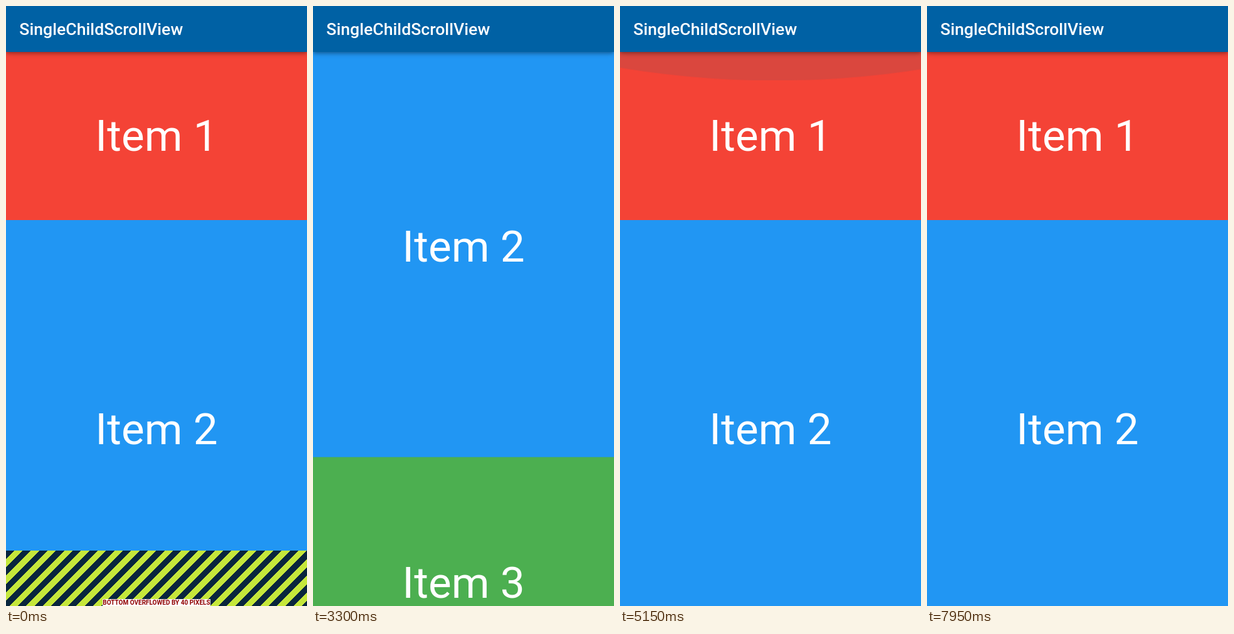
An HTML page for the animation above (8000 ms loop, 480 by 953 pixels).

```html
<!DOCTYPE html>
<html lang="en">
<head>
<meta charset="utf-8">
<title>SingleChildScrollView</title>
<style>
  html, body { margin: 0; width: 100%; height: 100%; overflow: hidden; }
  body { position: relative; background: #2196f3; color: #fff; font-family: Roboto, sans-serif; }

  header {
    position: absolute; top: 0; left: 0; width: 100%; height: 73px;
    box-sizing: border-box; padding-left: 21.33px;
    background: #0061a4;
    font-size: 26.67px; font-weight: 500; line-height: 75px;
    box-shadow: 0 2px 5px -1px rgba(0, 0, 0, .22), 0 4px 6px rgba(0, 0, 0, .14), 0 1px 10px rgba(0, 0, 0, .12);
  }

  main { position: absolute; top: 73px; left: 0; width: 100%; height: 880px; overflow: hidden; }

  .list { animation: scroll 8s linear infinite; }
  .item { display: flex; align-items: center; justify-content: center; font-size: 69.33px; }
  .one { height: 266.67px; background: #f44336; }
  .two { height: 666.67px; background: #2196f3; }
  .three { height: 400px; background: #4caf50; }

  /* Hazard strip shown while the column cannot scroll */
  .overflow {
    position: absolute; bottom: 0; left: 0; width: 100%; height: 88px;
    display: flex; align-items: flex-end; justify-content: center;
    background: repeating-linear-gradient(135deg, #08253d 0 9.428px, #c5e73b 9.428px 18.856px);
    animation: strip 8s step-end infinite;
  }
  .overflow span {
    background: #fff; color: #900000;
    font-size: 10px; font-weight: 700; line-height: 11px; white-space: nowrap;
  }

  /* Overscroll glow: a large circle flattened against the viewport edge */
  .glow {
    position: absolute; left: -472px; width: 1440px; height: 1440px;
    border-radius: 50%; background: #535f70; opacity: 0;
  }
  .top { top: -1343.5px; transform-origin: 50% 1343.5px; animation: glow-top 8s infinite; }
  .bottom { bottom: -1343.5px; transform-origin: 50% 96.5px; animation: glow-bottom 8s infinite; }

  @keyframes scroll {
    0%, 34.375% { transform: translateY(0); animation-timing-function: cubic-bezier(.4, 0, .75, .8); }
    41.25% { transform: translateY(-289px); animation-timing-function: cubic-bezier(.25, .5, .6, 1); }
    49.375%, 55.625% { transform: translateY(-453.33px); animation-timing-function: cubic-bezier(.45, 0, .6, 1); }
    62.75%, 67.5% { transform: translateY(0); animation-timing-function: cubic-bezier(.45, 0, .6, 1); }
    74.375%, 86.5% { transform: translateY(-453.33px); animation-timing-function: ease-in; }
    88.125% { transform: translateY(-441.3px); animation-timing-function: cubic-bezier(.35, .1, .55, 1); }
    95%, 100% { transform: translateY(0); }
  }
  @keyframes strip {
    0% { visibility: visible; }
    31.25%, 100% { visibility: hidden; }
  }
  @keyframes glow-bottom {
    0%, 49.375% { opacity: 0; transform: scaleY(0); }
    53.125% { opacity: .17; transform: scaleY(.715); }
    57.5%, 100% { opacity: 0; transform: scaleY(0); }
  }
  @keyframes glow-top {
    0%, 62.25% { opacity: 0; transform: scaleY(0); }
    64.375% { opacity: .16; transform: scaleY(.466); }
    68.75%, 100% { opacity: 0; transform: scaleY(0); }
  }
</style>
</head>
<body>
  <main>
    <div class="list">
      <div class="item one">Item 1</div>
      <div class="item two">Item 2</div>
      <div class="item three">Item 3</div>
    </div>
    <div class="glow top"></div>
    <div class="glow bottom"></div>
    <div class="overflow"><span>BOTTOM OVERFLOWED BY 40 PIXELS</span></div>
  </main>
  <header>SingleChildScrollView</header>
</body>
</html>
```
